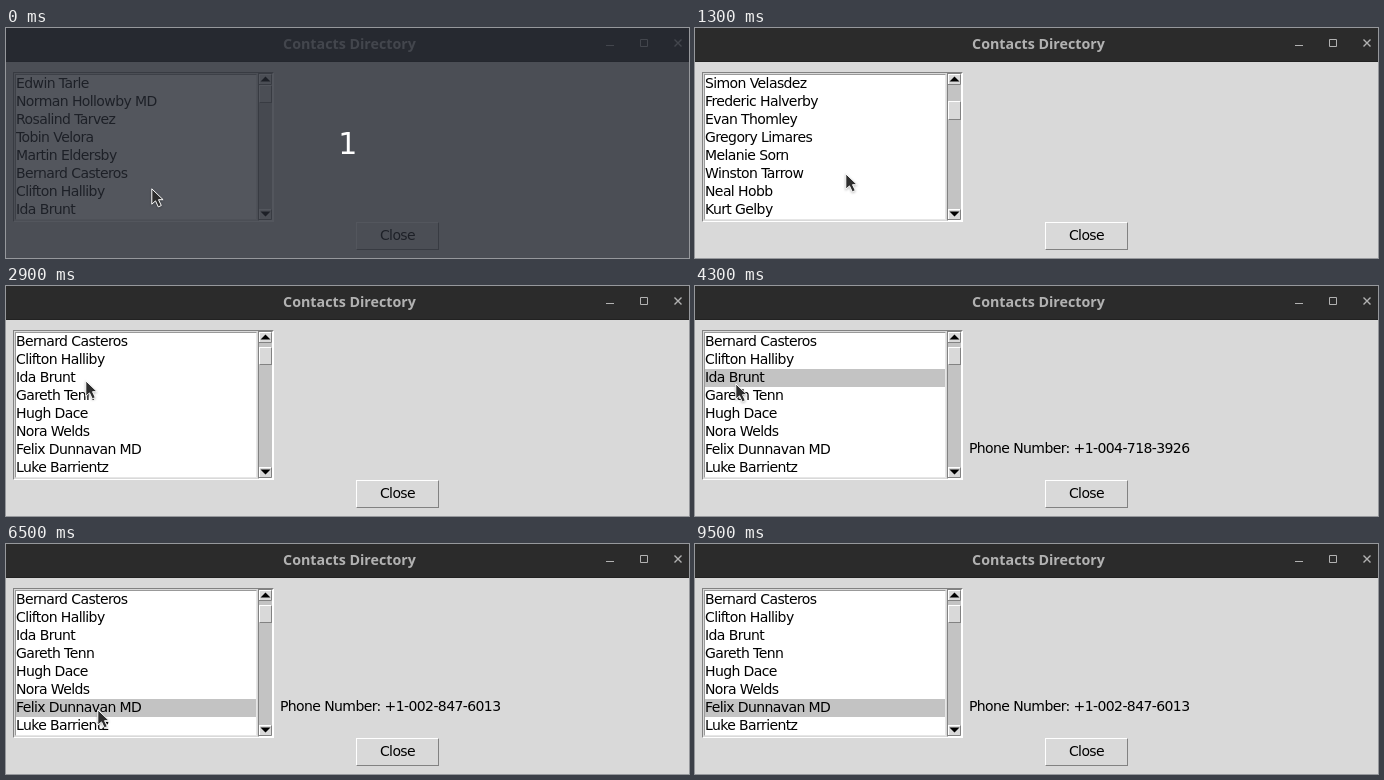
An HTML page that plays this animation: 683x230 px, repeating every 9900 ms.

```html
<!DOCTYPE html>
<html lang="en">
<head>
<meta charset="utf-8">
<title>Contacts Directory</title>
<style>
  html, body { margin: 0; width: 100%; height: 100%; overflow: hidden; background: #d9d9d9; }
  #stage {
    position: relative; width: 683px; height: 230px; overflow: hidden;
    background: #d9d9d9; color: #000;
    font: 14px/15px "DejaVu Sans", sans-serif; letter-spacing: -.6px; white-space: pre;
  }
  #stage div, #stage svg { position: absolute; box-sizing: border-box; }
  .sunken { border: 1px solid; border-color: #828282 #fff #fff #828282; }
  .raised { border: 1px solid; border-color: #fff #828282 #828282 #fff; background: #d9d9d9; }

  #bar { left: 0; top: 0; width: 683px; height: 34px; background: #2b2b2b; border-bottom: 1px solid #222; }
  #title {
    left: 0; top: 6px; width: 687px; line-height: 20px; text-align: center; letter-spacing: 0;
    color: #b2b2b2; font-family: "Noto Sans", sans-serif; font-size: 14.25px; font-weight: bold;
  }
  #controls { left: 595px; top: 5px; fill: none; stroke: #b2b2b2; stroke-linejoin: round; }

  #frame { left: 7px; top: 44px; width: 261px; height: 150px; }
  #well {
    left: 9px; top: 46px; width: 242px; height: 146px; overflow: hidden; background: #fff;
    border: 1px solid; border-color: #999 #e6e6e6 #e6e6e6 #999;
  }
  #rows { left: 0; top: 0; width: 240px; }
  #rows p { margin: 0; height: 18px; padding-top: 1px; box-sizing: border-box; }
  #rows p.on { background: #c3c3c3; }

  #scroll { left: 252px; top: 45px; width: 15px; height: 148px; background: #c3c3c3; }
  #arrows { left: 253px; top: 46px; }
  #thumb { left: 253px; width: 13px; }

  #phone { left: 274px; top: 155px; }
  #close { left: 350px; top: 194px; width: 83px; height: 28px; padding-top: 5px; text-align: center; }

  #shade { inset: 0; background: rgba(37, 41, 50, .79); }
  #count { left: 0; top: 98px; width: 683px; text-align: center; color: #fff; font-size: 30px; line-height: 36px; }
  #cursor { left: 0; top: 0; overflow: visible; filter: drop-shadow(0 1px 1px rgba(0, 0, 0, .25)); }
</style>
</head>
<body>
<div id="stage">
  <div id="bar"></div>
  <div id="title">Contacts Directory</div>
  <svg id="controls" width="88" height="24">
    <path d="M5 12.5h8M39.5 6.5h7v7h-7z"/>
    <path stroke-width="1.4" d="M73.5 6.5l7 7m0-7l-7 7"/>
  </svg>

  <div id="frame" class="sunken"></div>
  <div id="well"><div id="rows"></div></div>
  <div id="scroll" class="sunken"></div>
  <svg id="arrows" width="13" height="146">
    <path fill="#d9d9d9" d="M0 0h13v11h-13zM0 135h13v11h-13z"/>
    <path fill="none" stroke="#828282" d="M0 10.5h12.5v-10M0 145.5h12.5v-10"/>
    <path fill="none" stroke="#fff" d="M0 .5h12M0 135.5h12M.5 0v10M.5 135v10"/>
    <path d="M6.5 2.5l5 5h-10zM6.5 142.5l5-5h-10z"/>
  </svg>
  <div id="thumb" class="raised"></div>

  <div id="phone"></div>
  <div id="close" class="raised">Close</div>

  <div id="shade"><div id="count">1</div></div>
  <svg id="cursor" width="14" height="21">
    <path d="M.8 .8V16.2L4.5 12.9L7.3 18.9L10.3 17.5L7.5 11.7H12.1Z"
      fill="#2d2d2d" stroke="#fff" stroke-linejoin="round"/>
  </svg>
</div>

<script>
const LOOP = 9900, TICK = 100;
const ROW = 18, LIST_TOP = 47, ROWS_PER_NOTCH = 5;

const names = `Edwin Tarle,Norman Hollowby MD,Rosalind Tarvez,Tobin Velora,Martin Eldersby,
Bernard Casteros,Clifton Halliby,Ida Brunt,Gareth Tenn,Hugh Dace,Nora Welds,Felix Dunnavan MD,
Luke Barrientz,Helen Corvane,Victor Almsey,Diane Prowlett,Stuart Linfold,Grace Tembry,
Oscar Wendlow,Laura Kestin,Simon Velasdez,Frederic Halverby,Evan Thomley,Gregory Limares,
Melanie Sorn,Winston Tarrow,Neal Hobb,Kurt Gelby,Alice Morvane,Dennis Orlby,Sylvia Trent-Ash,
Walter Quenby,Irene Castle-Dow`.split(/,\s*/);

// Each burst turns the wheel one notch per tick.
const bursts = [
  { start: 1000, notches: 4, dir: 1 },
  { start: 1700, notches: 1, dir: 1 },
  { start: 1900, notches: 1, dir: -1 },
  { start: 2100, notches: 3, dir: -1 },
];

// Eased glides to a resting point; sway bends the way there sideways.
const glides = [
  { start: 900, end: 1300, x: 150, y: 145 },
  { start: 2000, end: 2900, x: 79, y: 94, sway: 192 },
  { start: 4200, end: 4900, x: 68, y: 104, sway: -36, waves: 2 },
  { start: 5800, end: 6300, x: 91, y: 165 },
  { start: 7200, end: 7800, x: 57, y: -24 },
  { start: 8200, end: 8300, x: 520, y: 270 },
  { start: 8300, end: 9500, x: 65, y: -24 },
];

const clicks = [
  { at: 3100, phone: "+1-004-718-3926" },
  { at: 5100, phone: "(570)038-9210" },
  { at: 6500, phone: "+1-002-847-6013" },
];

const $ = id => document.getElementById(id);
const clamp = (v, lo, hi) => Math.min(hi, Math.max(lo, v));
const easeOut = k => 1 - (1 - k) ** 2;

const items = names.map(name => {
  const p = document.createElement("p");
  p.textContent = name;
  return $("rows").appendChild(p);
});

function firstRow(t) {
  return bursts.reduce((row, { start, notches, dir }) =>
    row + dir * ROWS_PER_NOTCH * clamp((t - start) / TICK + 1, 0, notches), 0);
}

function pointer(t) {
  return glides.reduce((p, { start, end, x, y, sway = 0, waves = 1 }) => {
    const k = easeOut(clamp((t - start) / (end - start), 0, 1));
    return {
      x: p.x + (x - p.x) * k + sway * Math.sin(Math.PI * waves * k),
      y: p.y + (y - p.y) * k,
    };
  }, { x: 145, y: 160 });
}

const rowUnderPointer = t => firstRow(t) + Math.floor((pointer(t).y - LIST_TOP) / ROW);

function draw(t) {
  const first = firstRow(t);
  const click = clicks.filter(c => c.at <= t).pop();
  const selected = click ? rowUnderPointer(click.at) : -1;
  const { x, y } = pointer(t);
  const thumbTop = Math.round(57 + first * .82);
  const thumbEnd = Math.round(75.3 + first * .82);

  $("rows").style.top = -first * ROW + "px";
  $("thumb").style.top = thumbTop + "px";
  $("thumb").style.height = thumbEnd - thumbTop + "px";
  items.forEach((item, i) => item.classList.toggle("on", i === selected));
  $("phone").textContent = click ? "Phone Number: " + click.phone : "";
  $("cursor").style.transform = `translate(${Math.round(x)}px, ${Math.round(y)}px)`;
  $("shade").style.display = t < TICK ? "" : "none";
}

const start = performance.now();
function frame() {
  const t = (performance.now() - start) % LOOP;
  draw(Math.floor(t / TICK) * TICK);
  requestAnimationFrame(frame);
}
frame();
</script>
</body>
</html>
```
